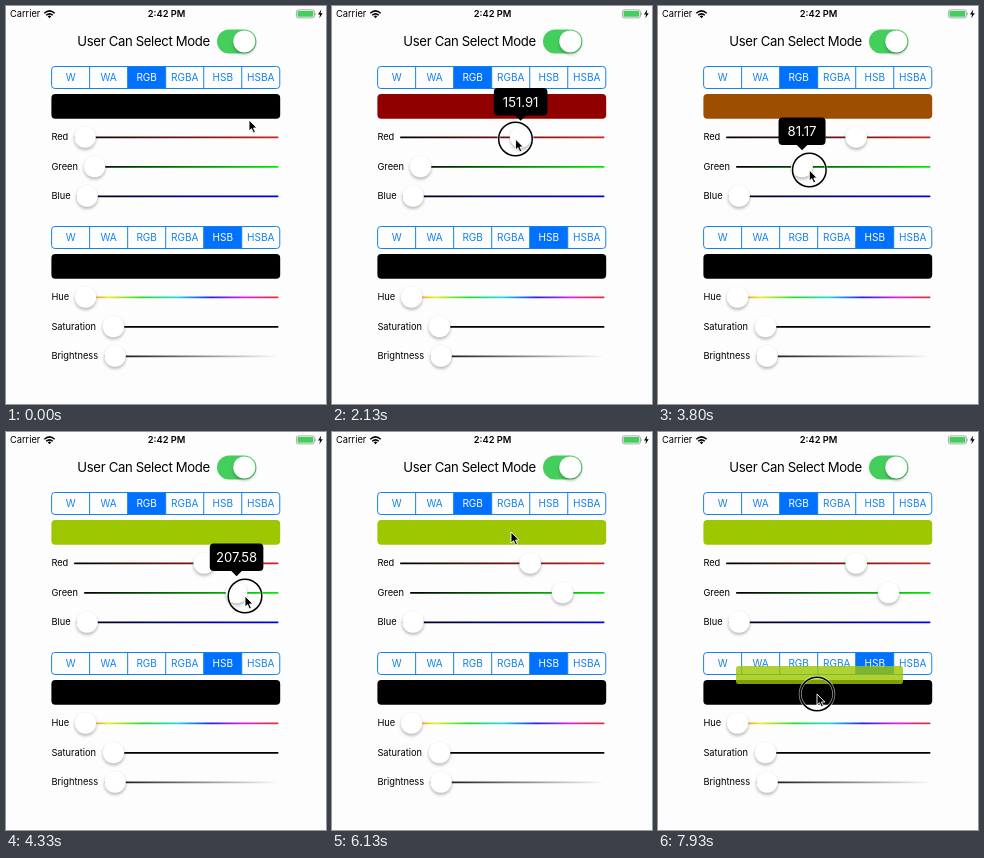
Recreate the animation shown at these times as an HTML page. Size 320 by 398 pixels, loop 8 s.

```html
<!DOCTYPE html>
<html lang="en">
<head>
<meta charset="utf-8">
<title>Colour sliders</title>
<style>
  html, body { margin: 0; height: 100%; overflow: hidden; background: #fefdfe; }
  svg { display: block; width: 100%; height: 100%; font: 9.28px Inter, sans-serif; }
  .title { font-size: 13.14px; letter-spacing: -.33px; }
  .segment { font-size: 10.05px; text-anchor: middle; }
  .value { font-size: 13.14px; text-anchor: middle; fill: #fff; }
  .knob { fill: #fff; stroke: #0001; stroke-width: .4; filter: drop-shadow(0 2.2px 1.8px #0004); }
</style>
</head>
<body>
<svg id="stage" viewBox="0 0 320 398"></svg>
<script>
const LOOP = 8000, FPS = 15;
const BLUE = '#0070ff', LINE = '#1482ea';
const MODES = ['W', 'WA', 'RGB', 'RGBA', 'HSB', 'HSBA'];
const TRACK_END = 272.5, KNOB_END = 263, MAX = 255;
const RAINBOW = ['#e33', '#ee2', '#2d3', '#2dd', '#22e', '#d2d', '#d33'];

// name, y, track start, knob rest position, track colours
const SLIDERS = [
  ['Red', 131, 68, 79, ['#000', '#c8281e']],
  ['Green', 160.5, 78, 88.5, ['#000', '#00f000']],
  ['Blue', 190, 70, 81, ['#000', '#00f']],
  ['Hue', 291, 69, 79.5, RAINBOW],
  ['Saturation', 320.5, 97, 107.5, ['#000', '#000']],
  ['Brightness', 350, 98, 109, ['#000', '#fefdfe']],
];

// Each track is a list of [time, ...values], eased between neighbours.
const CURSOR = [
  [0, 243, 114], [850, 74, 133], [1142, 74, 133], [2342, 193, 133], [2650, 193, 133],
  [3200, 90, 164], [3340, 90, 164], [3450, 95, 164], [4270, 239, 164], [4700, 239, 164],
  [5700, 179, 100], [7150, 179, 100], [7400, 172, 149], [7930, 159, 262],
];
const RED = [[1142, 0], [2342, 165.154]];
const GREEN = [[3450, 0], [4270, 207.58]];
const PRESSES = [[1000, 2500], [3400, 4600], [6270, LOOP]];
const LIFT = [[6750, 0], [7000, 1]];
const SHRINK = [[7420, 0], [7800, 1]];

function sample(keys, t) {
  const i = keys.findIndex(key => key[0] > t);
  if (i === 0) return keys[0].slice(1);
  if (i < 0) return keys.at(-1).slice(1);
  const [a, b] = [keys[i - 1], keys[i]];
  const u = (t - a[0]) / (b[0] - a[0]), ease = u * u * (3 - 2 * u);
  return a.slice(1).map((v, k) => v + (b[k + 1] - v) * ease);
}

function statusBar() {
  return `
    <text x="4" y="11.3">Carrier</text>
    <g fill="none" stroke="#000" stroke-width="1.5">
      <path d="M38.3 7.2Q43.5 2.6 48.7 7.2M40.2 9.3Q43.5 6.4 46.8 9.3"/>
    </g>
    <path d="M41.7 10.2Q43.5 8.8 45.3 10.2L43.5 12.2Z"/>
    <text x="160.5" y="11.3" text-anchor="middle" font-weight="600">2:42 PM</text>
    <rect x="290.4" y="3.9" width="18" height="8" rx="2" fill="none" stroke="#888" stroke-width=".7"/>
    <rect x="291.5" y="5" width="15.8" height="5.8" rx="1" fill="#44cf5d"/>
    <path d="M309.2 6.5q1.6 1.4 0 2.8z" fill="#888"/>
    <path d="M315.2 3.6L312 8.4h2.1l-.8 3.9 3.4-5h-2.1z"/>`;
}

function modePicker(y, selected) {
  const x = 45.6, step = 38.03;
  return `
    <rect x="${x + step * selected}" y="${y}" width="${step}" height="22" fill="${BLUE}"/>
    <rect x="${x}" y="${y}" width="${step * 6}" height="22" rx="3.2" fill="none" stroke="${LINE}"/>` +
    MODES.map((mode, i) => `
      ${i ? `<path d="M${x + step * i} ${y}v22" stroke="${LINE}"/>` : ''}
      <text class="segment" x="${x + step * (i + .5)}" y="${y + 14.6}"
        fill="${i === selected ? '#fff' : LINE}">${mode}</text>`).join('');
}

const swatch = (id, y) =>
  `<rect id="${id}" x="45.4" y="${y}" width="228.8" height="24.8" rx="4"/>`;

function slider([name, y, start, rest, colours]) {
  const stops = colours.map((c, i) =>
    `<stop offset="${i / (colours.length - 1)}" stop-color="${c}"/>`).join('');
  return `
    <linearGradient id="fill${name}">${stops}</linearGradient>
    <text x="45.4" y="${y + 3.3}">${name}</text>
    <rect x="${start}" y="${y - .5}" width="${TRACK_END - start}" height="1.7" rx=".8" fill="url(#fill${name})"/>
    <circle id="knob${name}" class="knob" cx="${rest}" cy="${y}" r="10.8"/>`;
}

const get = id => document.getElementById(id);
get('stage').innerHTML = `
  ${statusBar()}
  <text class="title" x="71.3" y="40">User Can Select Mode</text>
  <rect x="211" y="23.4" width="39.4" height="24" rx="12" fill="#44cf5d"/>
  <circle class="knob" cx="238.3" cy="35.4" r="11"/>
  ${modePicker(60.5, 2)}${swatch('mixed', 88)}
  ${modePicker(220.5, 4)}${swatch('dark', 248)}
  ${SLIDERS.map(slider).join('')}
  <g id="preview">
    <rect x="-114.4" y="-12.4" width="228.8" height="24.8" rx="4"/>
  </g>
  <g id="tip">
    <rect id="tipBox" y="-49" height="27.5" rx="4"/>
    <path d="M-6 -22.2h12l-6 6z"/>
    <text id="tipText" class="value" y="-30.3"></text>
  </g>
  <g id="cursor">
    <g id="touch" fill="none">
      <circle r="16.8" stroke="#fff" stroke-opacity=".6" stroke-width="3"/>
      <circle r="16.8" stroke="#000" stroke-width="1.5"/>
    </g>
    <path d="M0 0v11l2.5-2.3 1.9 4.2 2-.9-1.9-4h3.4z" stroke="#fff" stroke-width=".9"/>
  </g>`;

const toggle = (id, on) => get(id).setAttribute('visibility', on ? 'visible' : 'hidden');
const place = (id, x, y, scale = 1) =>
  get(id).setAttribute('transform', `translate(${x} ${y}) scale(${scale})`);

function setSlider(index, value) {
  const [name, , , rest] = SLIDERS[index];
  const x = rest + value / MAX * (KNOB_END - rest);
  get('knob' + name).setAttribute('cx', x);
  return x;
}

function showTip(index, x, value) {
  const label = value.toFixed(2), width = 14 + label.length * 6.6;
  get('tipText').textContent = label;
  get('tipBox').setAttribute('x', -width / 2);
  get('tipBox').setAttribute('width', width);
  place('tip', x, SLIDERS[index][1]);
}

function draw(t) {
  const [x, y] = sample(CURSOR, t);
  const press = PRESSES.findIndex(([from, to]) => t >= from && t < to);
  place('cursor', x, y);
  toggle('touch', press >= 0);

  const values = [sample(RED, t)[0], sample(GREEN, t)[0]];
  const knobs = values.map((value, i) => setSlider(i, value));
  const dragging = press === 0 || press === 1;
  toggle('tip', dragging);
  if (dragging) showTip(press, knobs[press], values[press]);

  const colour = `rgb(${values[0] * .95}, ${values[1] * .96}, 0)`;
  get('mixed').setAttribute('fill', colour);

  const [lift] = sample(LIFT, t), [shrink] = sample(SHRINK, t);
  const fall = Math.min(1, Math.max(0, (t - 7420) / 513)) ** 1.7;
  const preview = get('preview');
  toggle('preview', lift > 0);
  place('preview', 159.8 + 1.7 * fall, 100.4 + 142.6 * fall, 1 + .045 * lift - .315 * shrink);
  preview.setAttribute('fill', colour);
  preview.setAttribute('opacity', 1 - .2 * shrink);
  preview.style.filter = `drop-shadow(0 5px 13px rgba(0, 0, 0, ${.24 * lift * (1 - shrink)}))`;
}

function tick() {
  const t = performance.now() % LOOP;
  draw(Math.floor((t + 4) * FPS / 1000) * 1000 / FPS % LOOP);
  requestAnimationFrame(tick);
}
tick();
</script>
</body>
</html>
```
